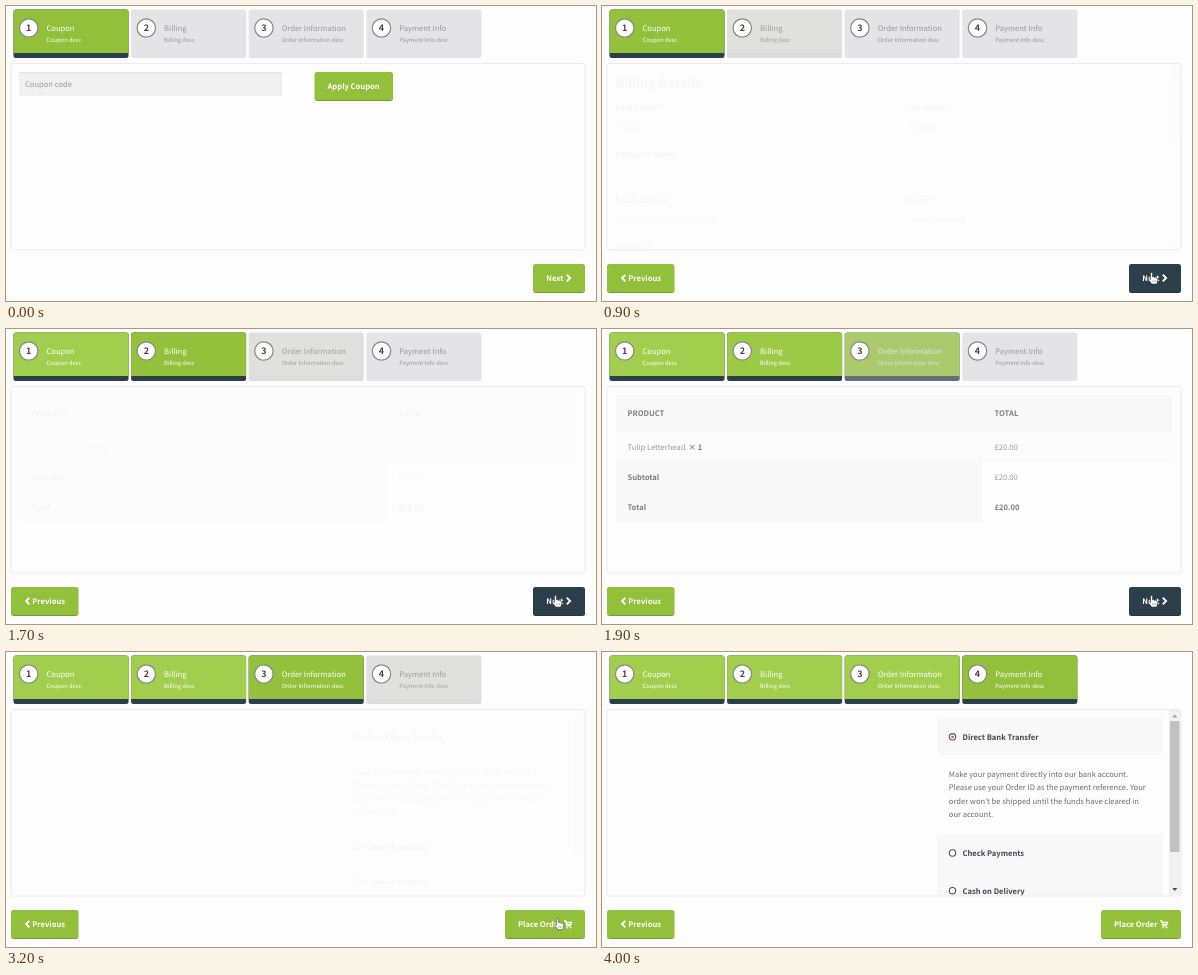
An HTML page that plays this animation: 590 by 295 pixels, repeating every 4100 ms.

```html
<!DOCTYPE html>
<html lang="en">
<head>
<meta charset="utf-8">
<title>Checkout steps</title>
<style>
html, body { margin: 0; width: 100%; height: 100%; overflow: hidden; background: #fefdfe; }
svg { display: block; width: 590px; height: 295px; }
text {
  font: 7.6px "Noto Sans CJK JP", "Noto Sans CJK SC", "Noto Sans CJK", "Noto Sans", sans-serif;
  fill: #6d6d6d; text-rendering: geometricPrecision; white-space: pre;
}
.bold { font-weight: 700; fill: #43454b; }
.small { font-size: 5.75px; }
.title { font-size: 12.7px; font-weight: 700; fill: #43454b; }
.digit { font-size: 9px; font-weight: 700; fill: #43454b; text-anchor: middle; }
.hint { fill: #9a9a9a; }
.white { fill: #fff; }
.icon { fill: none; stroke: #fff; stroke-width: 1.9; }
</style>
</head>
<body>
<svg id="stage" viewBox="0 0 590 295"></svg>
<script>
const LOOP = 4100, TICK = 100, FADE = 400, HOVER = 200;
const GREEN = [146, 192, 58], DONE = [161, 207, 77], DARK = [43, 63, 74];
const PAGE_STARTS = [-FADE, 850, 1650, 3150];
const stage = document.getElementById("stage");

const text = (x, y, words, cls = "") => `<text x="${x}" y="${y}" class="${cls}">${words}</text>`;
const rect = (x, y, w, h, fill, extra = "") =>
  `<rect x="${x}" y="${y}" width="${w}" height="${h}" fill="${fill}" ${extra}/>`;
const path = (d, extra) => `<path d="${d}" ${extra}/>`;
const group = (id, body, extra = "") => `<g id="${id}" ${extra}>${body}</g>`;

function tab(name, i) {
  const x = 7.5 + 117.6 * i;
  const labels = cls => text(x + 33, 25, name, cls) + text(x + 33, 36.1, name + " desc", "small " + cls);
  const active = rect(x, 3.5, 115, 48.5, "#2b3f4a", 'rx="2.5"') +
    path(`M${x} 47V6q0-2.5 2.5-2.5h110q2.5 0 2.5 2.5V47z`, `id="face${i}"`) + labels("white");
  return rect(x, 3.5, 115, 48.5, "#e4e3e5", 'rx="2.5"') + labels("hint") + group("tab" + i, active) +
    `<circle cx="${x + 15.2}" cy="22" r="9.2" fill="#fff" stroke="#858a85" stroke-width="1.2"/>` +
    text(x + 15.2, 25.4, i + 1, "digit");
}

function button(id, x, y, w, label, textX, icon = "") {
  return group(id, rect(x, y, w, 29, "#92c03a", `id="${id}Face" rx="2.5"`) +
    path(`M${x + 2} ${y + 28.5}h${w - 4}`, 'stroke="#000" stroke-opacity=".18"') +
    text(textX, y + 17.4, label, "bold white") + icon);
}

function field(x, y, w, label, value = "", required = true) {
  const star = required ? ' <tspan fill="#d22">*</tspan>' : "";
  return text(x + .5, y - 3.6, label + star, "bold") +
    rect(x, y, w, 24, "#f1f0f1") + path(`M${x} ${y + .5}h${w}`, 'stroke="#eae9ea"') +
    text(x + 5.5, y + 15.3, value);
}

function scrollbar(thumbHeight) {
  return rect(567, 58, 11.5, 185.5, "#f2f1f2") + rect(568, 69, 9.5, thumbHeight, "#c2c1c2") +
    path("M570.3 65.6l2.5-3 2.5 3z", 'fill="#a0a0a0"') + path("M570.3 236l2.5 3 2.5-3z", 'fill="#4c4c4c"');
}

function radio(y, label, checked) {
  return `<circle cx="350.5" cy="${y}" r="3.2" fill="#fff" stroke="#55565c" stroke-width="1.1"/>` +
    (checked ? `<circle cx="350.5" cy="${y}" r="1.4" fill="#b5645c"/>` : "") +
    text(360.5, y + 2.8, label, "bold");
}

const coupon = rect(13, 66, 263, 24, "#f1f0f1") + path("M13 66.5h263", 'stroke="#e6e5e6"') +
  text(19, 81, "Coupon code", "hint") + button("apply", 308.5, 66, 78.5, "Apply Coupon", 321.5);

const billing = text(13.5, 82.3, "Billing Details", "title") +
  field(13, 109, 257.5, "First Name", "Tural") + field(302.5, 109, 257.5, "Last Name", "Quvarov") +
  field(13, 155, 547, "Company Name", "", false) +
  field(13, 200.7, 257.5, "Email Address", "tur.quvarov@example.com") +
  field(302.5, 200.7, 257.5, "Phone", "+990555010042") +
  field(13, 246.5, 547, "Country") + scrollbar(63);

const order = rect(14, 66, 556, 37, "#f7f6f8") + rect(14, 103, 556, 30, "#fcfbfc") +
  rect(14, 133, 366, 60, "#f7f6f8") +
  text(25.5, 87.4, "PRODUCT", "bold") + text(392.5, 87.4, "TOTAL", "bold") +
  text(25.5, 121, "Tulip Letterhead") + text(86.5, 121, "× 1", "bold") + text(392.5, 121, "£20.00") +
  text(25.5, 151, "Subtotal", "bold") + text(392.5, 151, "£20.00") +
  text(25.5, 181.3, "Total", "bold") + text(392.5, 181.3, "£20.00", "bold");

const notice = [
  "Make your payment directly into our bank account.",
  "Please use your Order ID as the payment reference. Your",
  "order won’t be shipped until the funds have cleared in",
  "our account."
].map((line, i) => text(346.8, 125 + 13.35 * i, line)).join("");

const payment = rect(335, 66, 226, 37, "#f9f8f9") + radio(84.8, "Direct Bank Transfer", true) +
  group("notice", notice) +
  group("check", rect(335, 182, 226, 38, "#f9f8f9") + radio(201, "Check Payments")) +
  group("cash", rect(335, 219.5, 226, 38, "#f9f8f9") + radio(238.7, "Cash on Delivery")) + scrollbar(131);

const cart = path("M558 268.9h1.7l1.2 5h4.3M560.3 270.4h5.2l-.6 2h-4.2", 'fill="none" stroke="#fff" stroke-width="1.2"') +
  '<circle cx="561.3" cy="275.6" r=".9" fill="#fff"/><circle cx="564.7" cy="275.6" r=".9" fill="#fff"/>';

const hand = "M-1 1Q-1-.4 0-.4T1 1V4.2Q2.2 3.5 2.9 4.6 4 4 4.6 5.1 6 4.7 6 6.2V8.4Q6 9.6 5 11.2H.2" +
  "Q-.9 9.4-3 7.3-3.4 5.7-2 5.9L-1 6.7z";

stage.innerHTML =
  '<clipPath id="inside"><rect x="5.5" y="58" width="573.5" height="185.7"/></clipPath>' +
  ["Coupon", "Billing", "Order Information", "Payment Info"].map(tab).join("") +
  group("pages", [coupon, billing, order, payment].map((body, i) => group("page" + i, body)).join(""),
    'clip-path="url(#inside)"') +
  rect(5, 57.5, 574, 186.5, "none", 'rx="2.5" stroke="#ebeaec"') +
  button("previous", 5, 258, 67.5, "Previous", 26.3, path("M23.3 268.8l-3.2 3.3 3.2 3.3", 'class="icon"')) +
  button("next", 527, 258, 52, "Next", 540.3, path("M560.8 268.6l3.3 3.4-3.3 3.4", 'class="icon"')) +
  button("place", 499, 258, 80, "Place Order", 512, cart) +
  group("cursor", path(hand, 'fill="#fff" stroke="#333b3d" stroke-width=".6"') +
    path("M1.2 7.4v2M2.7 7.4v2M4.2 7.4v2", 'stroke="#555" stroke-width=".4"'));

const $ = id => document.getElementById(id);
const clamp = v => Math.min(1, Math.max(0, v));
const swing = v => .5 - Math.cos(Math.PI * clamp(v)) / 2;
const lerp = (a, b, p) => a + (b - a) * p;
const mix = (a, b, p) => `rgb(${a.map((v, i) => Math.round(lerp(v, b[i], p)))})`;
const show = (id, on) => $(id).setAttribute("display", on ? "inline" : "none");
const shift = (id, x, y) => $(id).setAttribute("transform", `translate(${x} ${y})`);

function draw(t) {
  const fades = PAGE_STARTS.map(start => swing((t - start) / FADE));
  const page = PAGE_STARTS.filter(start => t >= start).length - 1;

  fades.forEach((fade, i) => {
    $("tab" + i).setAttribute("opacity", fade);
    $("face" + i).setAttribute("fill", mix(GREEN, DONE, fades[i + 1] || 0));
    show("page" + i, i === page);
    $("page" + i).setAttribute("opacity", fade);
  });

  // The payment options unfold slightly while they fade in.
  const fold = fades[3] - 1;
  shift("notice", 0, 2.5 * fold);
  shift("check", 0, 6.5 * fold);
  shift("cash", 0, 8.5 * fold);

  show("previous", page > 0);
  show("next", page < 3);
  show("place", page === 3);
  $("nextFace").setAttribute("fill", mix(GREEN, DARK, swing((t - 575) / HOVER)));
  const placeHover = swing((t - 3275) / HOVER) - swing((t - 3775) / HOVER);
  $("placeFace").setAttribute("fill", mix(GREEN, DARK, placeHover));

  const arrive = swing((t - 450) / 200), slide = swing((t - 3150) / 200);
  show("cursor", t >= 500 && t < 3800);
  shift("cursor", lerp(540, 549.5, arrive) + 15 * slide, lerp(263, 266.8, arrive) - 1.8 * slide);
}

const began = performance.now();
function frame() {
  const t = (performance.now() - began) % LOOP;
  draw(Math.floor(t / TICK) * TICK);
  requestAnimationFrame(frame);
}
frame();
</script>
</body>
</html>
```
